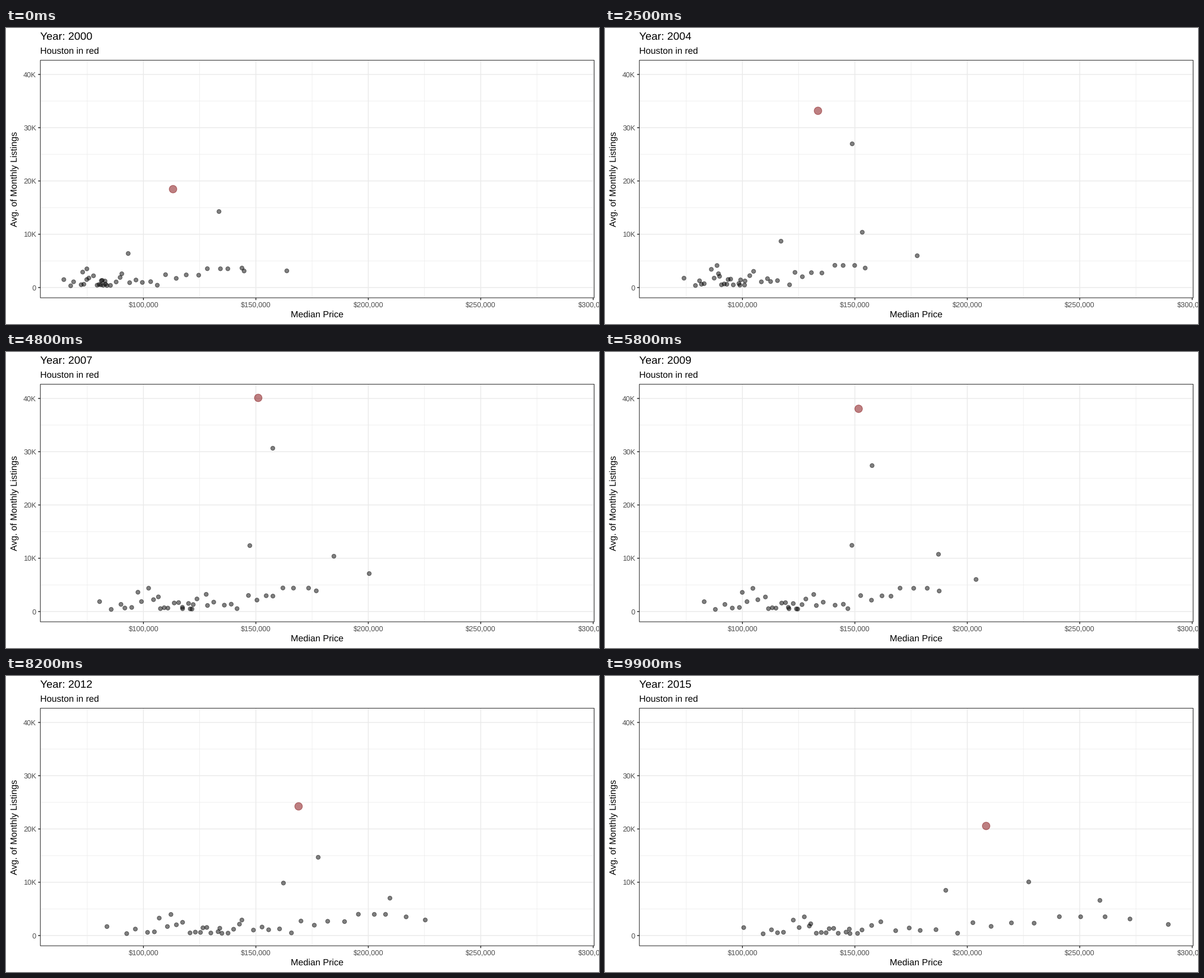
Write a matplotlib script that moves like this. It is 1058x529 px and loops after 10 s.

```python
import numpy as np
import matplotlib.pyplot as plt
from matplotlib.animation import FuncAnimation
from matplotlib.patches import Rectangle

W, H, DPI = 1058, 529, 64
FRAMES, INTERVAL = 100, 100
PT = 72 / DPI  # points per stage pixel
LEFT, RIGHT, TOP, BOTTOM = 61.3, 1049.4, 57.6, 482.2
ZERO = 463.8  # height of the zero line
GRID, DARK, GREY, RED = "#ebebeb", "#333333", "#4d4d4d", "#7c0004"

plt.rcParams["font.family"] = "Liberation Sans"
plt.rcParams["text.hinting"] = "none"

# Paths of the large markets: x and y at each key time, Houston last
KEYS = [0, 10, 25, 48, 68, 82, 99]
LARGE = [
    ([380, 417, 441, 476, 477, 557, 756], [328, 278, 207, 172, 234, 324, 368]),
    ([218, 255, 314, 435, 446, 495, 608], [403, 398, 381, 346, 345, 370, 383]),
    ([421, 454, 459, 585, 605, 685, 883], [429, 387, 365, 365, 358, 397, 401]),
    ([501, 542, 557, 648, 676, 748, 1005], [434, 421, 407, 396, 417, 436, 444]),
    ([298, 346, 380, 450, 455, 522, 680], [288, 248, 148, 82, 121, 233, 268]),
]

# Cheapest, middle and dearest of the small markets at the same times
LOW = [106, 124, 142, 163, 186, 184, 249]
MID = [182, 193, 241, 327, 354, 388, 437]
HIGH = [421, 451, 465, 557, 637, 710, 937]

SMALL = 36
rng = np.random.default_rng(7)
rank = np.linspace(0, 1, SMALL)
phase = rng.uniform(0, 2 * np.pi, SMALL)
volume = 3 + np.minimum(rng.exponential(8, SMALL), 40)
volume += 22 * np.clip((rank - 0.8) / 0.1, 0, 1)  # dear markets list more


def at(frame, values):
    return np.interp(frame, KEYS, values)


def small_dots(frame):
    low, mid, high = (at(frame, v) for v in (LOW, MID, HIGH))
    lower = low + (mid - low) * np.minimum(2 * rank, 1) ** 0.65
    upper = (high - mid) * np.maximum(2 * rank - 1, 0) ** 1.6
    x = lower + upper + 4 * np.sin(phase + frame / 12)
    y = ZERO - volume * (1 + 0.25 * np.sin(np.pi * frame / (FRAMES - 1)))
    return np.column_stack([x, y])


def large_dots(frame):
    return np.array([(at(frame, x), at(frame, y)) for x, y in LARGE])


fig = plt.figure(figsize=(W / DPI, H / DPI), dpi=DPI, facecolor="white")
ax = fig.add_axes([0, 0, 1, 1])
ax.set_xlim(0, W)
ax.set_ylim(H, 0)
ax.axis("off")


def line(x, y, color, width, z):
    ax.plot(x, y, color=color, lw=width * PT, solid_capstyle="butt",
            snap=False, zorder=z)


def label(x, y, text, size, color="black", **kw):
    return ax.text(x, y, text, fontsize=size * PT, color=color, **kw)


for price in range(75, 301, 25):
    x = 245.2 + (price - 100) * 4.012
    major = price % 50 == 0
    line([x, x], [TOP, BOTTOM], GRID, 1.57 if major else 0.78, 1)
    if major:
        line([x, x], [BOTTOM, BOTTOM + 4], DARK, 1.57, 2)
        label(x, 499, f"\\${price},000", 12.9, GREY, ha="center")
for count in range(0, 41, 5):
    y = ZERO - count * 9.52
    major = count % 10 == 0
    line([LEFT, RIGHT], [y, y], GRID, 1.57 if major else 0.78, 1)
    if major:
        line([LEFT - 4, LEFT], [y, y], DARK, 1.57, 2)
        label(54, y + 4.6, f"{count}K" if count else "0", 12.9, GREY, ha="right")
ax.add_patch(Rectangle((LEFT, TOP), RIGHT - LEFT, BOTTOM - TOP, fill=False,
                       ec=DARK, lw=1.1 * PT, snap=False, zorder=5))

title = label(61, 21.3, "", 19.4)
label(61, 46, "Houston in red", 16.15)
label(555.3, 517.3, "Median Price", 16.15, ha="center")
label(19.6, 270, "Avg. of Monthly Listings", 16.15, rotation=90,
      rotation_mode="anchor", ha="center", va="baseline")

others = SMALL + len(LARGE) - 1
radii = np.array([3.66] * others + [6.8])
dots = ax.scatter(np.zeros(others + 1), np.zeros(others + 1),
                  s=(2 * radii * PT) ** 2, c=["black"] * others + [RED],
                  alpha=0.5, linewidths=1.04 * PT, zorder=3)


def draw(frame):
    title.set_text(f"Year: {round(2000 + 15 * frame / (FRAMES - 1))}")
    dots.set_offsets(np.vstack([small_dots(frame), large_dots(frame)]))
    return title, dots


anim = FuncAnimation(fig, draw, frames=FRAMES, init_func=lambda: draw(0),
                     interval=INTERVAL, repeat=True, cache_frame_data=False)
plt.show()
```
